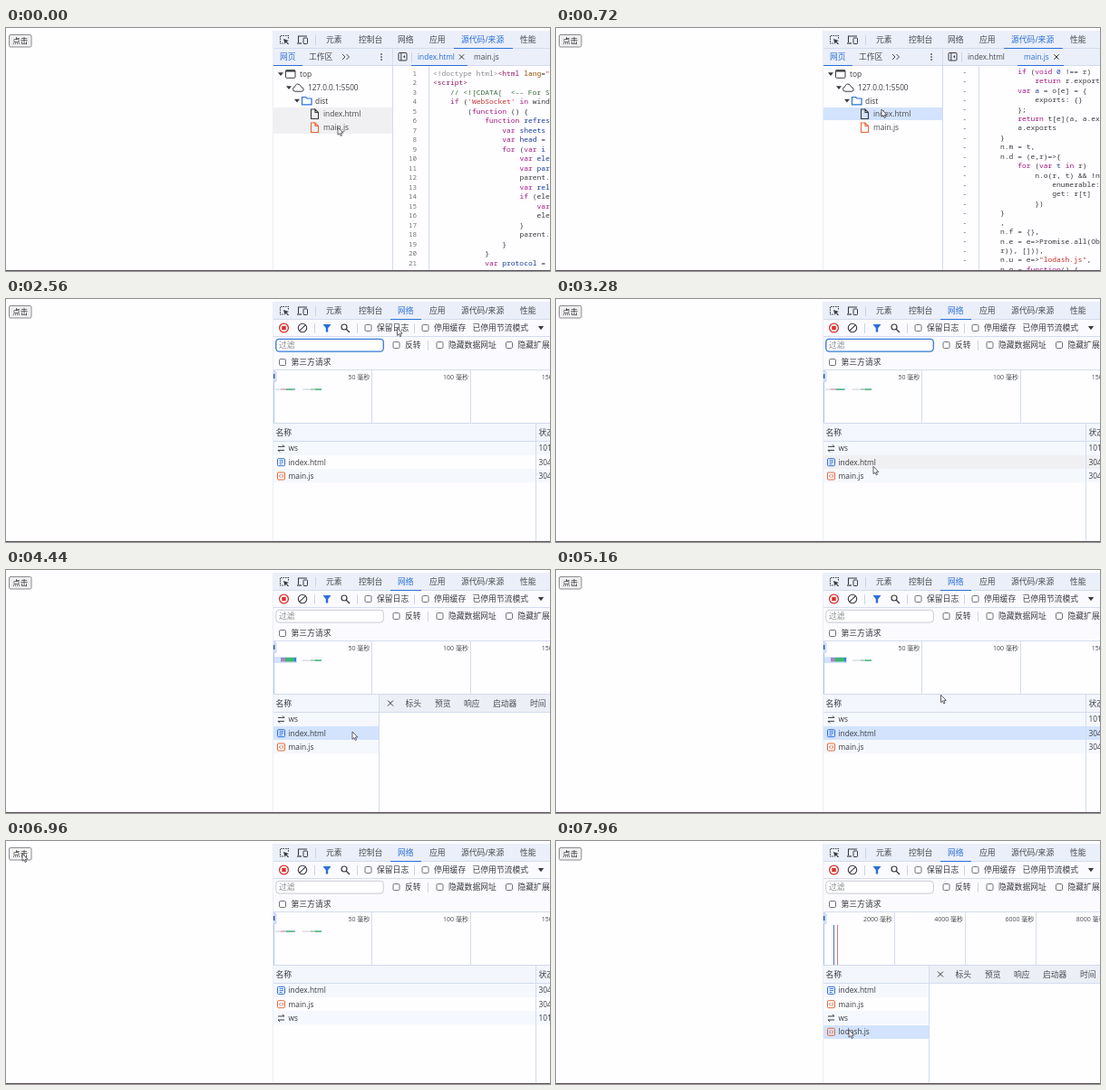
An HTML page with a canvas for the animation above (8 s loop, 600 by 269 pixels).

```html
<!DOCTYPE html>
<html lang="zh-CN">
<head>
<meta charset="utf-8">
<title>DevTools</title>
<style>
  html, body { margin: 0; width: 100%; height: 100%; overflow: hidden; background: #fefdff; }
  canvas { display: block; width: 600px; height: 269px; }
</style>
</head>
<body>
<canvas id="stage" width="600" height="269"></canvas>
<script>
const c = document.getElementById('stage').getContext('2d');
const LOOP = 8000;
const UI = '"Open Sans", "Noto Sans CJK SC", "Noto Sans CJK", sans-serif';
const MONO = '"Noto Sans Mono", "DejaVu Sans Mono", monospace';
const INK = '#393b40', SOFT = '#484b50', BLUE = '#2a6fd8', LINE = '#d3dcee', BAR = '#ebeff9';
const PAGE = '#fefdff', PICK = '#d3e3fd', GRAY = '#f0f0f2', ORANGE = '#e8683a';

// Moments at which something is clicked or reloaded, in ms
const AT = {
  openMain: 200, pickIndex: 680, openIndex: 760, blur: 1300, network: 1960, reload: 2160,
  details: 3600, close: 5000, reload2: 6200, press: 6880, lodash: 7040, pickLodash: 7880
};

// Pointer stops: time, x, y
const PATH = [
  [0, 366, 110], [240, 366, 110], [600, 359, 90], [880, 359, 90], [1300, 395, 60],
  [1700, 416, 12], [1780, 416, 12], [1920, 441, 14], [2400, 441, 14], [3200, 350, 186],
  [3400, 350, 184], [3640, 346, 180], [4080, 352, 178], [4400, 382, 179], [4520, 382, 179],
  [4840, 423, 145], [5060, 423, 145], [5760, 450, 26], [5880, 456, 21], [6000, 440, 28],
  [6440, 18, 14], [6960, 18, 14], [7560, 300, 180], [7800, 323, 209], [8000, 323, 209]
];

const HTML_CODE = [
  '<!doctype html><html lang="en">', '<script>', '    // <![CDATA[  <-- For SVG support',
  "    if ('WebSocket' in window) {", '        (function () {', '            function refreshCSS() {',
  '                var sheets = ', '                var head = ', '                for (var i = 0',
  '                    var elem', '                    var parent', '                    parent.rem',
  '                    var rel', '                    if (elem', '                        var url',
  '                        elem', '                    }', '                    parent.app',
  '                }', '            }', '            var protocol = '
];
const JS_CODE = [
  '        if (void 0 !== r)', '            return r.exports;', '        var a = o[e] = {',
  '            exports: {}', '        };', '        return t[e](a, a.exports', '        a.exports',
  '    }', '    n.m = t,', '    n.d = (e,r)=>{', '        for (var t in r)',
  '            n.o(r, t) && !n.o', '                enumerable: !0', '                get: r[t]',
  '            })', '    }', '    ,', '    n.f = {},', '    n.e = e=>Promise.all(Object',
  '    r)), [])),', '    n.u = e=>"lodash.js",', '    n.g = function() {'
];

const TOKENS = [
  [/^\/\/.*/, '#3c7040'], [/^<!doctype html>/, '#8b8b90'], [/^<\w+>?/, '#8e1a68'],
  [/^'[^']*'?|^"[^"]*"?/, '#c5302a'], [/^(var|function|if|for|in|return|void)\b/, '#a3197f'],
  [/^lang\b/, '#8e4e00'], [/^\d+/, '#2440b8'], [/^\w+/, INK], [/^\s+|^./, INK]
];

function box(x, y, w, h, color) { c.fillStyle = color; c.fillRect(x, y, w, h); }

// Text centred vertically on y
function text(s, x, y, color = INK, size = 8.8, align = 'left', family = UI) {
  c.font = size + 'px ' + family;
  c.textAlign = align;
  c.fillStyle = color;
  c.fillText(s, x, y + size * 0.36);
}

function round(x, y, w, h, r, stroke, fill) {
  c.beginPath();
  c.roundRect(x, y, w, h, r);
  if (fill) { c.fillStyle = fill; c.fill(); }
  if (stroke) { c.strokeStyle = stroke; c.stroke(); }
}

function path(points, stroke, fill, width = 1) {
  c.beginPath();
  for (let i = 0; i < points.length; i += 2) c.lineTo(points[i], points[i + 1]);
  if (fill) { c.closePath(); c.fillStyle = fill; c.fill(); }
  if (stroke) { c.lineWidth = width; c.strokeStyle = stroke; c.stroke(); c.lineWidth = 1; }
}

function ring(x, y, r, color, width = 1.1) {
  c.beginPath();
  c.arc(x, y, r, 0, 7);
  c.lineWidth = width;
  c.strokeStyle = color;
  c.stroke();
  c.lineWidth = 1;
}

function cross(x, y, r = 2.7) {
  path([x - r, y - r, x + r, y + r], INK);
  path([x - r, y + r, x + r, y - r], INK);
}

const down = (x, y, r = 3) => path([x - r, y - r * 0.6, x + r, y - r * 0.6, x, y + r * 0.7], null, INK);
const divider = (x, y = 32) => box(x, y - 5, 1, 11, '#cbd5e8');
const rule = (x, y, right = 600) => box(x, y, right - x, 1, LINE);
const underline = (x, y, w) => box(x, y, w, 1, BLUE);

function check(x, y, label) {
  round(x - 3.5, y - 3.5, 7, 7, 1.3, '#707378', '#fff');
  text(label, x + 9.5, y);
}

function fileIcon(x, y, color) {
  path([x + 4.5, y - 5, x, y - 5, x, y + 5.5, x + 8, y + 5.5, x + 8, y - 1.5, x + 4.5, y - 5,
    x + 4.5, y - 1.5, x + 8, y - 1.5], color, null, 1.1);
}

function rowIcon(kind, y) {
  if (kind === 'ws') {
    path([300, y - 2, 307, y - 2, 305, y - 4], INK);
    path([307, y + 2, 300, y + 2, 302, y + 4], INK);
    return;
  }
  const color = kind === 'js' ? ORANGE : BLUE;
  round(299.5, y - 4, 8, 8, 1, color);
  if (kind === 'js') {
    path([303, y - 1.7, 301.4, y, 303, y + 1.7], color);
    path([304.2, y - 1.7, 305.8, y, 304.2, y + 1.7], color);
  } else {
    for (const d of [-2, 0, 2]) box(301.5, y + d - 0.4, d > 0 ? 3 : 4.5, 0.9, color);
  }
}

function drawPage(t) {
  box(0, 0, 600, 269, PAGE);
  const pressed = t >= AT.press && t < AT.press + 120;
  const hover = t > 6420 && t < 7000;
  round(3.5, 7.5, 24.5, 13.5, 1.5, '#8b8b8f', pressed ? '#f5f5f5' : hover ? '#e3e3e5' : '#efeff1');
  text('点击', 7.2, 14.4, '#2c2c2e', 8.5);
}

function drawMainTabs(t, network) {
  box(295, 3, 305, 20, BAR);
  if (t > 1640 && t < 1840) box(381, 3, 42, 19, '#dee2eb');
  if (t > 5860 && t < 5960) box(424, 3, 34, 19, '#e1e8f6');

  c.setLineDash([1.5, 1]);
  path([306, 17, 302.5, 17, 302.5, 8.5, 311.5, 8.5, 311.5, 12], INK, null, 1.1);
  c.setLineDash([]);
  path([306, 12, 312, 14, 309.5, 15, 312, 17.5, 311, 18.2, 308.7, 15.8, 307.6, 18], null, INK);
  path([326, 17, 321, 17], INK, null, 1.2);
  path([322.5, 16, 322.5, 9, 332, 9], INK, null, 1.1);
  round(328, 11, 4.5, 6.5, 0.7, INK);
  divider(341, 13);

  const tabs = [['元素', 353], ['控制台', 389], ['网络', 432], ['应用', 467], ['源代码/来源', 502], ['性能', 567]];
  const active = network ? '网络' : '源代码/来源';
  for (const [label, x] of tabs) text(label, x, 13, label === active ? BLUE : SOFT);
  rule(295, 22);
  if (network) underline(424, 22, 34);
  else underline(494, 22, 65);
}

function drawCode(lines, top, step, numbered) {
  c.save();
  c.beginPath();
  c.rect(427, 42, 173, 226);
  c.clip();
  box(466, 42, 1, 226, LINE);
  lines.forEach((line, i) => {
    const y = top + i * step;
    text(numbered ? i + 1 : '-', 453, y, numbered ? '#76777b' : '#4b68a5', 7.6, 'right', MONO);
    let col = 0, prev = '';
    while (col < line.length) {
      const rest = line.slice(col);
      const [re, color] = TOKENS.find(([r]) => r.test(rest));
      const word = re.exec(rest)[0];
      const defined = /^(var|function)$/.test(prev) && /^\w/.test(word);
      if (word.trim()) {
        text(word, 471 + col * 4.77, y, defined ? '#1c3f9c' : color, 7.95, 'left', MONO);
        prev = word;
      }
      col += word.length;
    }
  });
  c.restore();
}

function drawTree(t) {
  const mainOpen = t >= AT.openMain && t < AT.pickIndex;
  const indexBg = t >= AT.pickIndex && t < AT.blur ? PICK : mainOpen ? (t > 480 ? GRAY : null) : GRAY;
  if (indexBg) box(295, 88, 131, 14, indexBg);
  if (t < AT.pickIndex) box(295, 102, 131, 15, mainOpen ? PICK : GRAY);

  down(303, 51);
  round(308.5, 46.8, 10.5, 8.5, 1, INK);
  box(308.5, 46.5, 10.5, 2, INK);
  text('top', 324, 51, INK, 8.4);

  down(312, 66);
  c.beginPath();
  c.arc(319, 67.7, 2.5, Math.PI / 2, Math.PI * 1.45);
  c.arc(322, 65.6, 3.4, Math.PI * 1.1, Math.PI * 1.95);
  c.arc(326, 68, 2.2, Math.PI * 1.5, Math.PI / 2);
  c.closePath();
  c.strokeStyle = INK;
  c.stroke();
  text('127.0.0.1:5500', 333, 66, INK, 8.2);

  down(321, 80.5);
  path([326.5, 84.8, 326.5, 76.5, 330.5, 76.5, 332, 78, 337, 78, 337, 84.8, 326, 84.8], BLUE, null, 1.2);
  text('dist', 341, 80.5, INK, 8.4);
  fileIcon(336.5, 95, INK);
  text('index.html', 350, 95, SOFT, 8.35);
  fileIcon(336.5, 110, ORANGE);
  text('main.js', 350, 110, SOFT, 8.4);
}

function drawSources(t) {
  const mainTab = t >= AT.openMain && t < AT.openIndex;
  box(295, 23, 305, 18, BAR);
  text('网页', 302, 32, BLUE);
  text('工作区', 334, 32, SOFT);
  for (const x of [371, 375.5]) path([x, 29, x + 3, 32, x, 35], SOFT);
  for (const y of [29, 32, 35]) box(413.3, y - 0.7, 1.5, 1.5, INK);
  round(433, 27.5, 9, 8.5, 1, INK);
  path([435.8, 27.5, 435.8, 36], INK);
  path([440, 30, 438, 31.8, 440, 33.6], null, INK);
  divider(447);

  text('index.html', 454, 32, mainTab ? SOFT : BLUE, 8.25);
  text('main.js', 516, 32, mainTab ? BLUE : SOFT, 8.3);
  cross(mainTab ? 552 : 502.5, 32);
  rule(295, 41);
  underline(295, 41, 32);
  if (mainTab) underline(509, 41, 51);
  else underline(447, 41, 62);

  drawTree(t);
  box(426, 23, 1, 245, LINE);
  if (mainTab) drawCode(JS_CODE, 48, 10.43, false);
  else drawCode(HTML_CODE, 50, 10.5, true);
}

function drawToolbar(t) {
  box(295, 23, 305, 56, '#fbfbff');
  ring(306.5, 32, 4.9, '#d6342c', 1.3);
  box(304.3, 29.8, 4.4, 4.4, '#d6342c');
  ring(327, 32, 4.7, INK);
  path([323.8, 35.2, 330.2, 28.8], INK, null, 1.1);
  divider(340);
  path([349.5, 28, 358.5, 28, 355.2, 32.2, 355.2, 36.5, 352.8, 36.5, 352.8, 32.2], null, BLUE);
  ring(373, 31, 3, INK, 1.2);
  path([375.2, 33.2, 379, 37], INK, null, 1.3);
  divider(387);
  check(399.5, 32, '保留日志');
  divider(450);
  check(462.5, 32, '停用缓存');
  text('已停用节流模式', 514.5, 32);
  down(590, 32, 3.2);
  rule(295, 41);

  const focus = t < AT.details;
  c.lineWidth = focus ? 1.3 : 0.9;
  round(297.8, 44.3, 118.5, 13.8, 3.5, focus ? '#3478d8' : '#c3c6cf', '#fff');
  c.lineWidth = 1;
  text('过滤', 301, 51.3, '#86898f');
  check(430.5, 51, '反转');
  divider(465, 51);
  check(478.5, 51, '隐藏数据网址');
  check(555, 51, '隐藏扩展程序');
  check(305, 70, '第三方请求');
  rule(295, 78);
}

function drawOverview(t, loaded) {
  const late = t >= AT.lodash;
  const gap = late ? 78.2 : 108.6;
  for (let i = 1; i <= 4; i++) {
    const x = 295 + gap * i;
    box(Math.floor(x), 79, 1, 58, '#d4deef');
    text(i * (late ? 2000 : 50) + ' 毫秒', x - 2.3, 86.8, SOFT, 7, 'right');
  }
  box(295, 79, 1, 58, '#a9c4f0');
  round(294.5, 79.5, 4, 12.5, 1.5, null, '#c9dcfa');
  box(295, 83, 1.3, 5, '#2b4f94');

  if (late) {
    box(306, 93, 1, 44, '#3f6fc8');
    box(310, 93, 1, 44, '#dc7566');
  } else if (loaded) {
    const picked = t >= AT.details && t < AT.reload2;
    if (picked) {
      box(296, 96, 25, 7, '#d3e3fd');
      box(303, 97, 5, 4.5, '#a985c6');
      box(308, 97, 10, 4.5, '#3cb66f');
      box(318, 97, 2, 4.5, '#3c7de0');
    } else {
      box(297, 99.5, 6, 1.2, '#d5d5da');
      box(303, 99.2, 6, 1.6, '#d3a9c0');
      box(309, 99.2, 8, 1.8, '#5abd85');
      box(317, 99.2, 2, 1.6, '#79a9df');
    }
    box(327, 99.5, 9, 1.2, '#d5d5da');
    box(336, 99.2, 5, 1.6, '#a5c8b4');
    box(341, 99.2, 7, 1.8, '#5abd85');
  }
  rule(295, 137);
}

function drawRequests(t, loaded) {
  const second = t >= AT.reload2;
  const open = t >= AT.details && t < AT.close || t >= AT.pickLodash;
  const right = open ? 411 : 600;
  const WS = ['ws', 'ws', '101'];
  const pages = [['index.html', 'html', '304'], ['main.js', 'js', '304']];
  let rows = [];
  if (loaded) rows = second ? [...pages, WS] : [WS, ...pages];
  if (t >= AT.lodash) rows.push(['lodash.js', 'js', '304']);

  let selected = -1, hover = -1;
  if (t >= AT.details && !second) selected = 1;
  if (t >= AT.pickLodash) selected = 3;
  else if (t > 7700) hover = 3;
  if (t > 3100 && t < AT.details) hover = 1;

  box(295, 138, right - 295, 19, '#f3f6fc');
  text('名称', 297.5, 147.5);
  rule(295, 157, right);
  rows.forEach(([name, kind, status], i) => {
    const y = 165.4 + i * 15.3;
    const bg = i === selected ? PICK : i === hover ? GRAY : i % 2 ? PAGE : '#f5f8fd';
    box(295, Math.round(y - 7.6), right - 295, 15, bg);
    rowIcon(kind, y);
    text(name, 311.5, y, INK, 8.35);
    if (!open) text(status, 587.5, y, INK, 8.3);
  });

  if (open) {
    box(411, 138, 189, 130, PAGE);
    box(411, 138, 189, 19, '#eceff6');
    rule(411, 157);
    box(411, 138, 1, 130, LINE);
    cross(424, 147.5, 3);
    const tabs = [['标头', 440.5], ['预览', 473], ['响应', 505], ['启动器', 537], ['时间', 578]];
    for (const [label, x] of tabs) text(label, x, 147.5, SOFT);
  } else {
    text('状态', 587.5, 147.5);
    box(584, 138, 1, 130, LINE);
  }
}

function drawNetwork(t) {
  const loaded = t >= AT.reload && !(t >= AT.reload2 && t < AT.reload2 + 80);
  drawToolbar(t);
  drawOverview(t, loaded);
  drawRequests(t, loaded);
}

function drawPointer(t) {
  const i = PATH.findIndex(p => p[0] > t);
  const [t0, x0, y0] = PATH[i - 1], [t1, x1, y1] = PATH[i];
  const k = (t - t0) / (t1 - t0), e = k * k * (3 - 2 * k);
  c.save();
  c.translate(x0 + (x1 - x0) * e, y0 + (y1 - y0) * e);
  path([0, 0, 0, 8.3, 1.9, 6.6, 3.2, 9.5, 4.5, 8.9, 3.3, 6.1, 5.8, 6.1, 0, 0], '#3a3a40', '#fff', 0.8);
  c.restore();
}

function draw(now) {
  const t = now % LOOP;
  const network = t >= AT.network;
  drawPage(t);
  drawMainTabs(t, network);
  if (network) drawNetwork(t);
  else drawSources(t);
  box(294, 3, 1, 265, '#eceef5');
  box(0, 268, 600, 1, '#5d5360');
  drawPointer(t);
}

const start = performance.now();
function tick() {
  draw(performance.now() - start);
  requestAnimationFrame(tick);
}
tick();
</script>
</body>
</html>
```
